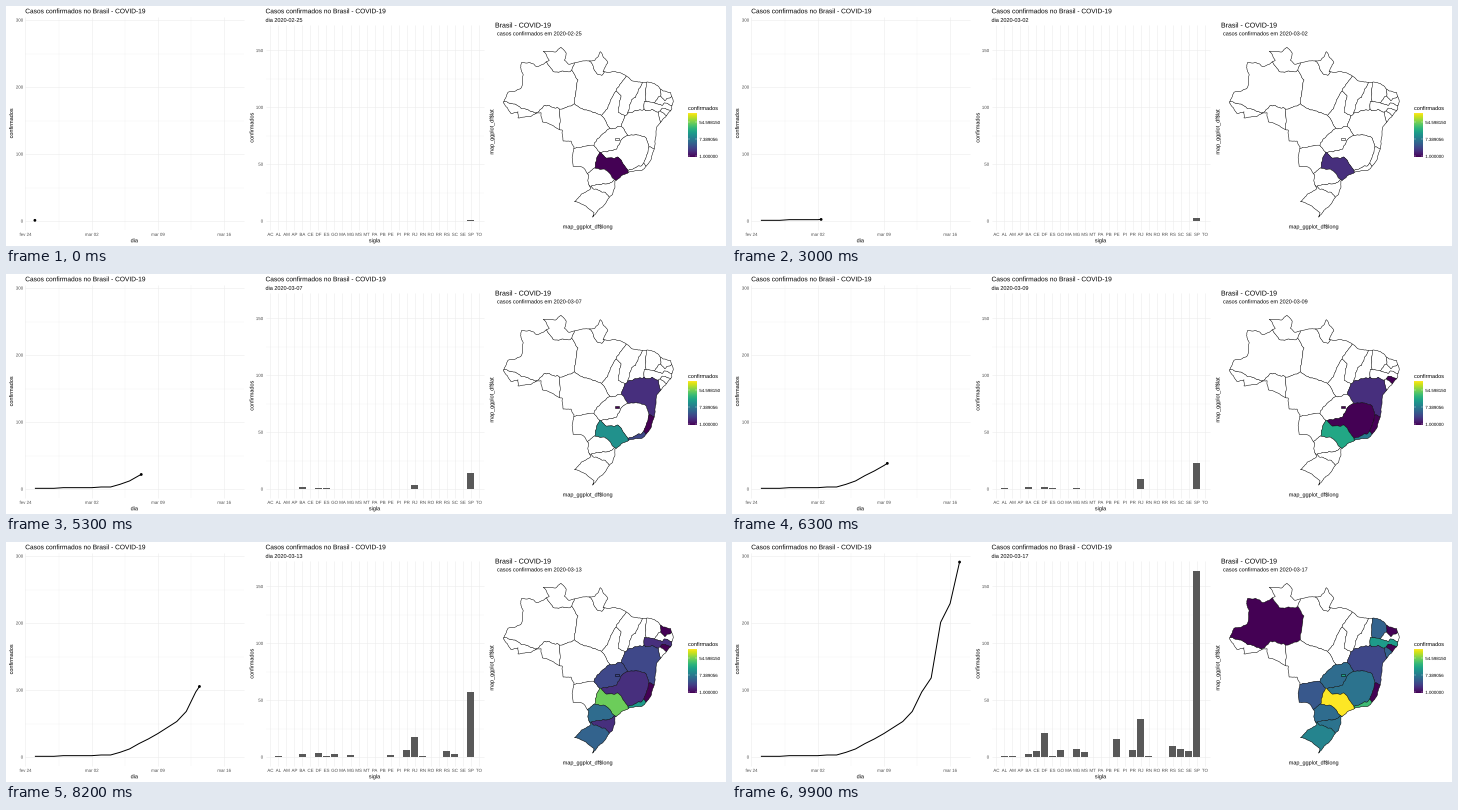
These frames come from a looping animation (720x240 px, 10 s). A matplotlib script:

```python
import numpy as np
import matplotlib.pyplot as plt
from matplotlib.animation import FuncAnimation
from matplotlib.patches import Circle, PathPatch, Polygon, Rectangle
from matplotlib.textpath import TextPath
from matplotlib.transforms import Affine2D

plt.rcParams["font.family"] = "Liberation Sans"

W, H, DPI = 720, 240, 100
FRAMES, STEP = 100, 100
PX = 72 / DPI
GRAY, GRID = "#4d4d4d", "#ebebeb"
START = np.datetime64("2020-02-25")
DAYS = 22

STATES = ("AC AL AM AP BA CE DF ES GO MA MG MS MT PA PB PE PI PR "
          "RJ RN RO RR RS SC SE SP TO").split()

# Turning points (day, cumulative cases); growth between them is exponential.
GROWTH = {
    "SP": [(0, 1), (8, 3), (11, 13), (18, 65), (19, 136), (21, 164)],
    "RJ": [(9, 1), (13, 8), (21, 33)],
    "ES": [(9, 1)],
    "BA": [(10, 1), (11, 2), (21, 3)],
    "DF": [(11, 1), (18, 4), (21, 21)],
    "MG": [(12, 1), (18, 2), (21, 7)],
    "AL": [(12, 1)],
    "RS": [(14, 1), (16, 4), (21, 10)],
    "PR": [(17, 6)],
    "GO": [(17, 3), (20, 3), (21, 6)],
    "PE": [(17, 2), (20, 2), (21, 16)],
    "SC": [(17, 2), (19, 6), (21, 7)],
    "RN": [(17, 1)],
    "AM": [(18, 1)],
    "SE": [(18, 1), (20, 1), (21, 5)],
    "MS": [(20, 2), (21, 4)],
    "CE": [(21, 5)],
}
days = np.arange(DAYS)


def grow(points):
    at, count = np.array(points).T
    n = np.round(np.exp(np.interp(days, at, np.log(count))))
    return np.where(days < at[0], 0, n)


cases = {s: grow(p) for s, p in GROWTH.items()}
total = sum(cases.values())
TOP = np.log(max(cases["SP"]))

fig = plt.figure(figsize=(W / DPI, H / DPI), dpi=DPI, facecolor="white")
ax = fig.add_axes([0, 0, 1, 1])
ax.axis("off")


def text_path(x, y, s, size, align=0, angle=0):
    """Outline of s, its capitals centred on y; align 0, 0.5 or 1."""
    path = TextPath((0, 0), s, size=size)
    shift = -align * path.get_extents().x1
    move = (Affine2D().translate(shift, -0.36 * size).scale(1, -1)
            .rotate_deg(-angle).translate(x, y))
    return move.transform_path(path)


def text(x, y, s, size, color="black", align=0, angle=0):
    path = text_path(x, y, s, size, align, angle)
    return ax.add_patch(PathPatch(path, fc=color, lw=0, zorder=6))


def line(x, y, width=0.55, color=GRID):
    return ax.plot(x, y, color=color, lw=width * PX, zorder=1,
                   solid_capstyle="butt")[0]


# Line chart
L_LEFT, L_RIGHT, L_TOP, L_BOTTOM = 19.1, 237.6, 10.6, 224


def day_x(d):
    return 28.9 + 9.46 * d


def total_y(v):
    return 215 - 0.67 * v


for i, label in enumerate(["fev 24", "mar 02", "mar 09", "mar 16"]):
    x = day_x(7 * i - 1)
    line([x, x], [L_TOP, L_BOTTOM])
    text(x, 228.3, label, 4.4, GRAY, 0.5)
    y = total_y(100 * i)
    line([L_LEFT, L_RIGHT], [y, y])
    text(17, y, str(100 * i), 4.4, GRAY, 1)
    if i < 3:
        x, y = day_x(7 * i + 2.5), total_y(100 * i + 50)
        line([x, x], [L_TOP, L_BOTTOM], 0.3)
        line([L_LEFT, L_RIGHT], [y, y], 0.3)
text(19.2, 4.9, "Casos confirmados no Brasil - COVID-19", 6.6)
text(128.3, 234.3, "dia", 5.5, align=0.5)
text(5, 117.5, "confirmados", 5.5, align=0.5, angle=90)

curve = line([], [], 1.0, "black")
curve.set_zorder(3)
dot = ax.add_patch(Circle((0, 0), 1.4, fc="black", lw=0, zorder=4))

# Bar chart
B_LEFT, B_RIGHT, B_TOP, B_BOTTOM = 259.6, 477.6, 19.3, 224.3
BAR = 8.02


def count_y(v):
    return 215 - 1.137 * v


for v in range(0, 151, 25):
    y, major = count_y(v), v % 50 == 0
    line([B_LEFT, B_RIGHT], [y, y], 0.55 if major else 0.3)
    if major:
        text(257, y, str(v), 4.4, GRAY, 1)
bars = {}
for i, s in enumerate(STATES):
    x = 264.3 + BAR * i
    line([x, x], [B_TOP, B_BOTTOM])
    text(x, 228.3, s, 4.4, GRAY, 0.5)
    if s in cases:
        bars[s] = ax.add_patch(Rectangle((x - 0.45 * BAR, 215), 0.9 * BAR, 0,
                                         fc="#595959", lw=0, zorder=3))
text(259.5, 4.9, "Casos confirmados no Brasil - COVID-19", 6.6)
BAR_DATE = 259.5, 13.9
bar_date = text(*BAR_DATE, "dia", 5.5)
text(368.5, 234.3, "sigla", 5.5, align=0.5)
text(245.5, 121.8, "confirmados", 5.5, align=0.5, angle=90)

# Map, in degrees west and south. The states are cells of a power diagram
# whose sites are (west, south, pull), cut out by the country's outline.
COUNTRY = [
    (73.8, 7.1), (72.9, 5.1), (70, 4.3), (69.4, 1.1), (70, -.6), (69.8, -1.7),
    (67.9, -1.75), (66.3, -.75), (63.4, -2.2), (64.8, -4.3), (62, -4.1),
    (60.7, -5.2), (59.5, -3.9), (59.9, -2.2), (58.9, -1.3), (56, -2),
    (52.9, -2.2), (51.65, -4.2), (49.9, -1.7), (51, .4), (48.4, .3),
    (46.1, 1.1), (44.3, 2.5), (41.5, 2.9), (40, 2.85), (37.2, 4.8),
    (35.4, 5.2), (34.83, 7.3), (35.15, 8.9), (36.4, 10.5), (38.6, 13),
    (39, 16), (39.7, 19.5), (41, 22), (42, 23), (44.7, 23.3), (46.3, 24),
    (48.3, 25.5), (48.8, 28.5), (50.3, 30.4), (52.2, 32.2), (53.4, 33.75),
    (53.1, 32.7), (55.6, 30.9), (57.6, 30.2), (55.9, 28.4), (53.8, 27.1),
    (54.5, 25.5), (54.3, 24.1), (55.6, 22.4), (57.9, 22.1), (58.1, 19.8),
    (57.7, 17.6), (58.4, 16.3), (60.2, 16.3), (60.4, 13.8), (62.1, 13.1),
    (65, 11.9), (65.3, 9.8), (67.7, 10.7), (70.6, 11), (70.6, 9.6),
    (72.2, 10), (74, 7.5), (73.8, 7.1)]

SITES = {
    "AC": [(71.1, 9.7, 12)],
    "AM": [(69, 4.1, 30), (61, 4, 18), (65.5, .3, 13)],
    "RO": [(63.2, 11, 1)],
    "RR": [(61.5, -2.2, 12)],
    "PA": [(53, 5, 21), (54.5, 0, 9.5), (48.7, 1.2, 10)],
    "AP": [(51.8, -1.5, 10.5)],
    "TO": [(48.3, 10.8, 0), (48.2, 7.3, 3.5)],
    "MA": [(44.8, 3.8, 8), (46, 7.6, 3.6)],
    "PI": [(43.6, 8.3, 4), (41.8, 5.2, 4.3)],
    "CE": [(39.5, 5.3, 6.4)],
    "RN": [(36.5, 5.8, 5.6)],
    "PB": [(37.6, 7.1, 5), (35.7, 7, 5.2)],
    "PE": [(40.2, 8.3, 2.2), (38.2, 8.4, 4.3), (36.2, 8.3, 4.9)],
    "AL": [(36.6, 9.5, 4.7)],
    "SE": [(37.3, 10.6, 4.8)],
    "BA": [(41.8, 12.5, -5.7), (44.6, 12.2, -1.4), (39.6, 17, -12),
           (43, 10.6, 4), (39.6, 10.1, 2.8), (38.6, 10.9, 4.6)],
    "MT": [(55.8, 12.8, 13.7), (52.5, 13, .7), (58.5, 11, 2.5)],
    "MS": [(54.8, 20.5, 0)],
    "GO": [(49.6, 16.2, 0), (47.3, 14.2, -4.6)],
    "MG": [(44.6, 18.6, 4.9), (48.8, 19.4, -4)],
    "ES": [(40.6, 19.8, -8.5)],
    "RJ": [(42.8, 22.3, -10)],
    "SP": [(48.8, 22, -1), (51.2, 21.7, -3.5)],
    "PR": [(51.5, 24.7, -.5)],
    "SC": [(51.2, 27, -2.5), (49.3, 27.8, -3.5)],
    "RS": [(53.6, 29.6, 0), (51.8, 29.4, -.6)],
}
SCALE_X, SCALE_Y = 4.34, 4.36
rng = np.random.default_rng(7)


def to_stage(west, south):
    return 497.3 + SCALE_X * (73.99 - west), 41 + SCALE_Y * (south + 5.27)


def roughen(pts, levels=3, amount=0.09):
    """Midpoint displacement, so that a few points look like a coast."""
    pts = np.array(pts, float)
    for _ in range(levels):
        step = np.diff(pts, axis=0)
        mid = pts[:-1] + step / 2
        mid += step[:, ::-1] * [1, -1] * rng.uniform(-amount, amount,
                                                     (len(step), 1))
        out = np.empty((2 * len(pts) - 1, 2))
        out[::2], out[1::2] = pts, mid
        pts = out
    return pts


def ripple(u, v, waves=6, size=0.05):
    """Smooth noise that bends the state borders."""
    a, b, phase = rng.uniform(-6, 6, (3, waves))
    return size * sum(np.sin(a[i] * u + b[i] * v + phase[i])
                      for i in range(waves))


country = ax.add_patch(Polygon(np.column_stack(to_stage(*roughen(COUNTRY).T)),
                               fc="none", ec="black", lw=0.5 * PX, zorder=5,
                               joinstyle="round"))

west, south = np.meshgrid(np.arange(34, 75, 0.1), np.arange(-6, 35, 0.1))
map_x, map_y = to_stage(west, south)
bent_w, bent_s = west + ripple(west, south), south + ripple(west, south)
power = {s: np.min([(bent_w - w) ** 2 + (bent_s - t) ** 2 - pull
                    for w, t, pull in sites], axis=0)
         for s, sites in SITES.items()}

shapes = {}
for s in SITES:
    rest = np.min([p for name, p in power.items() if name != s], axis=0)
    cells = ax.contourf(map_x, map_y, rest - power[s], levels=[0, 1e6])
    shapes[s] = ax.add_patch(PathPatch(cells.get_paths()[0], fc="white",
                                       ec="black", lw=0.4 * PX, zorder=3))
    shapes[s].set_clip_path(country)
    cells.remove()
shapes["DF"] = ax.add_patch(Rectangle(to_stage(48.3, 15.5), 0.95 * SCALE_X,
                                      0.55 * SCALE_Y, fc="white", ec="black",
                                      lw=0.5 * PX, zorder=4))
viridis = plt.get_cmap("viridis")

text(489, 19, "Brasil - COVID-19", 7.0)
MAP_DATE = 491, 27.4
map_date = text(*MAP_DATE, "casos", 5.5)
text(581.5, 220.5, "map_ggplot_df$long", 5.5, align=0.5)
text(485.5, 126, "map_ggplot_df$lat", 5.5, align=0.5, angle=90)

# Legend
K_LEFT, K_RIGHT, K_TOP, K_BOTTOM = 682, 690.6, 107.5, 150.7
text(K_LEFT, 102, "confirmados", 5.5)
ax.imshow(np.linspace(1, 0, 256)[:, None], cmap=viridis, aspect="auto",
          extent=(K_LEFT, K_RIGHT, K_BOTTOM, K_TOP), zorder=2)
for exponent in (0, 2, 4):
    y = K_BOTTOM - 0.4 - (K_BOTTOM - K_TOP) * exponent / TOP
    for x in (K_LEFT, K_RIGHT - 1.7):
        line([x, x + 1.7], [y, y], 0.3, "white").set_zorder(3)
    text(693.3, y, f"{np.exp(exponent):.6f}", 4.4)

ax.set_xlim(0, W)
ax.set_ylim(H, 0)


def update(frame):
    t = frame * (DAYS - 1) / (FRAMES - 1)
    day = int(t + 1e-9)

    now = np.interp(t, days, total)
    curve.set_data(day_x(np.append(days[:day + 1], t)),
                   total_y(np.append(total[:day + 1], now)))
    dot.center = day_x(t), total_y(now)

    for s, bar in bars.items():
        bar.set_height(count_y(np.interp(t, days, cases[s])) - 215)
        n = cases[s][day]
        shapes[s].set_facecolor(viridis(np.log(n) / TOP) if n else "white")

    bar_date.set_path(text_path(*BAR_DATE, f"dia {START + int(round(t))}", 5.5))
    map_date.set_path(text_path(
        *MAP_DATE, f"casos confirmados em {START + day}", 5.5))
    return []


anim = FuncAnimation(fig, update, frames=FRAMES, interval=STEP, repeat=True,
                     repeat_delay=0, blit=False)
plt.show()
```
